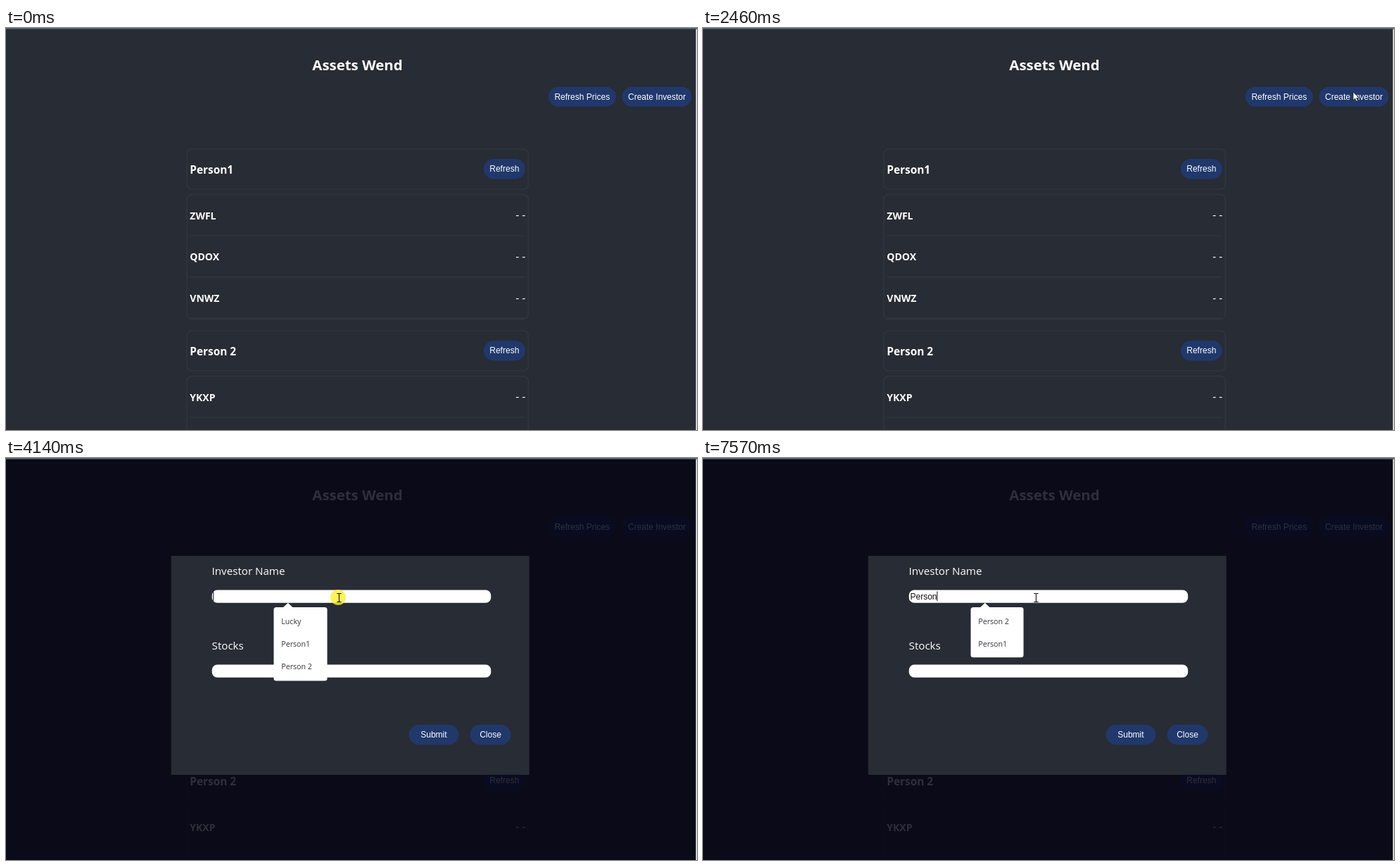
An HTML page for the animation above (8000 ms loop, 982 by 571 pixels).

```html
<!DOCTYPE html>
<html lang="en">
<head>
<meta charset="utf-8">
<title>Investor form</title>
<style>
  html, body { margin: 0; width: 100%; height: 100%; overflow: hidden; background: #282c34; }
  svg { display: block; width: 982px; height: 571px; }
  text { font-family: "Open Sans", "Noto Sans", sans-serif; fill: #fff; white-space: pre; }
  .title { font-size: 20.4px; font-weight: 700; text-anchor: middle; }
  .person { font-size: 15.4px; font-weight: 700; }
  .ticker { font-size: 14px; font-weight: 700; }
  .price { font-size: 15.5px; text-anchor: end; }
  .label { font-size: 15.15px; }
  .option { font-size: 10.65px; fill: #303236; }
  .button { font: 12px "Liberation Sans", Arial, sans-serif; text-anchor: middle; }
  .typed { font: 12px "Liberation Sans", Arial, sans-serif; fill: #111; }
  .card { fill: none; stroke: #31353e; stroke-width: 1.6; }
  .pill { fill: #20386b; }
  .field { fill: #fff; }
</style>
</head>
<body>
<svg id="stage" viewBox="0 0 982 571">
  <rect width="982" height="571" fill="#282c34"/>
  <g id="page"></g>
  <g id="modal">
    <rect y="2" width="980.5" height="569" fill="#050413" fill-opacity=".83"/>
    <rect x="234.7" y="139" width="509" height="311" fill="#282c34"/>
    <g id="form"></g>
    <text id="typed" class="typed" x="294.5" y="200.5"></text>
    <rect id="caret" y="189.5" width="1" height="13.5" fill="#111"/>
    <g id="menu">
      <path d="M393 213L400.7 205.8L408.4 213Z" fill="#fff"/>
      <rect id="menuBox" x="380.5" y="212" rx="3.5" fill="#fff"/>
      <g id="options"></g>
    </g>
  </g>
  <rect width="982" height="1.7" fill="#56636b"/>
  <rect x="980.5" y="1.7" width="1.5" height="570" fill="#f4f4f4"/>
  <circle id="click" r="11" fill="#ffee2b" fill-opacity=".78"/>
  <path id="arrow" d="M0 0V11.6L2.7 9.1L4.6 13.2L6.5 12.3L4.7 8.4H8.2Z" fill="#fff" stroke="#15171c" stroke-width=".7"/>
  <path id="beam" d="M-3.2 -6H-.8L0 -5.3L.8 -6H3.2M0 -5.3V5.3M-3.2 6H-.8L0 5.3L.8 6H3.2" fill="none" stroke="#111" stroke-width="1.1"/>
</svg>
<script>
const LOOP = 8000;
const $ = id => document.getElementById(id);

function add(parent, tag, attrs, content = "") {
  const node = document.createElementNS("http://www.w3.org/2000/svg", tag);
  for (const key in attrs) node.setAttribute(key, attrs[key]);
  node.textContent = content;
  parent.append(node);
  return node;
}
const text = (parent, cls, x, y, content) => add(parent, "text", { class: cls, x, y }, content);
const box = (parent, cls, x, y, width, height, rx) =>
  add(parent, "rect", { class: cls, x, y, width, height, rx });

function button(parent, x, y, width, label) {
  box(parent, "pill", x, y, width, 28.4, 14.2);
  text(parent, "button", x + width / 2, y + 18.2, label);
}

function investor(y, name, tickers) {
  const page = $("page");
  box(page, "card", 257, y, 485.3, 57, 7);
  text(page, "person", 261.3, y + 35, name);
  button(page, 678.8, y + 14, 59, "Refresh");
  box(page, "card", 257, y + 64.5, 485.3, 177, 7);
  tickers.forEach((ticker, i) => {
    const top = y + 64.5 + i * 58.7;
    text(page, "ticker", 261.3, top + 35, ticker);
    text(page, "price", 738.3, top + 34.8, "- -");
    add(page, "path", { class: "card", d: `M261 ${top + 58.5}H738` });
  });
}

text($("page"), "title", 499.5, 60, "Assets Wend");
button($("page"), 770.8, 83.4, 96, "Refresh Prices");
button($("page"), 875.5, 83.4, 99, "Create Investor");
investor(172, "Person1", ["ZWFL", "QDOX", "VNWZ"]);
investor(430, "Person 2", ["YKXP", "", ""]);

[["Investor Name", 165.5], ["Stocks", 271.5]].forEach(([label, y]) => {
  text($("form"), "label", 292.6, y, label);
  box($("form"), "field", 292.7, y + 22, 396.5, 18.3, 7.5);
});
button($("form"), 572.4, 378.8, 71, "Submit");
button($("form"), 659.5, 378.8, 58, "Close");

const options = [0, 1, 2].map(i => text($("options"), "option", 391.3, 236 + i * 32.2, ""));

// Pointer moves: start, end, number of positions, and a curve as [x, y] control points.
const moves = [
  { from: 720, to: 1120, steps: 5, path: [[905, 461], [925, 370], [921, 260], [917, 219]] },
  { from: 1430, to: 1950, steps: 6, path: [[917, 216], [917, 170], [922, 110], [924, 91]] },
  { from: 2940, to: 3730, steps: 9, path: [[921, 92], [800, 110], [560, 165], [477, 194.5]] },
  { from: 3830, to: 4040, steps: 3, path: [[475, 189], [474, 192], [473, 196], [473.4, 198.5]] }
];

// Each row: time, typed text, caret visible.
const typing = [
  [0, "", false], [4140, "", true], [4650, "", false], [5160, "", true], [5650, "", false],
  [5860, "P", true], [6040, "Pe", true], [6390, "Per", true], [6660, "Pers", true],
  [6760, "Perso", true], [7260, "Perso", false], [7570, "Person", true]
];

const show = (id, on) => $(id).setAttribute("visibility", on ? "inherit" : "hidden");
const place = (id, [x, y]) => $(id).setAttribute("transform", `translate(${x} ${y})`);

function bezier([a, b, c, d], p) {
  const q = 1 - p;
  return [0, 1].map(k => q * q * q * a[k] + 3 * q * q * p * b[k] + 3 * q * p * p * c[k] + p * p * p * d[k]);
}

function pointerAt(t) {
  const move = moves.filter(m => t >= m.from).pop();
  if (!move) return null;
  const last = move.steps - 1;
  const gap = (move.to - move.from) / last;
  const p = Math.min(last, Math.floor((t - move.from) / gap + 1e-6)) / last;
  return bezier(move.path, p * p * (3 - 2 * p));
}

function drawMenu(t, typed) {
  const names = typed ? ["Person 2", "Person1", ""] : ["Lucky", "Person1", "Person 2"];
  options.forEach((option, i) => option.textContent = names[i]);
  const settled = t >= 6040;
  $("menuBox").setAttribute("width", settled ? 75 : 76);
  $("menuBox").setAttribute("height", settled ? 71.3 : typed ? 72.2 : 104.5);
}

function draw(t) {
  const [, typed, caretOn] = typing.filter(row => t >= row[0]).pop();
  const open = t >= 2530;
  show("modal", open);
  show("menu", open && t >= 4140);
  show("caret", open && caretOn);
  $("typed").textContent = typed;
  $("caret").setAttribute("x", 294.3 + (typed ? $("typed").getComputedTextLength() : 0));
  drawMenu(t, typed);

  const pointer = pointerAt(t);
  const overField = t >= 3730;
  show("arrow", pointer && !overField);
  show("beam", pointer && overField);
  if (pointer) ["arrow", "beam"].forEach(id => place(id, pointer));

  const firstClick = t >= 2260 && t < 2460;
  show("click", firstClick || (t >= 4140 && t < 4340));
  place("click", firstClick ? [924, 91] : [472, 198]);
}

const start = performance.now();
function tick() {
  draw((performance.now() - start) % LOOP);
  requestAnimationFrame(tick);
}
tick();
</script>
</body>
</html>
```
